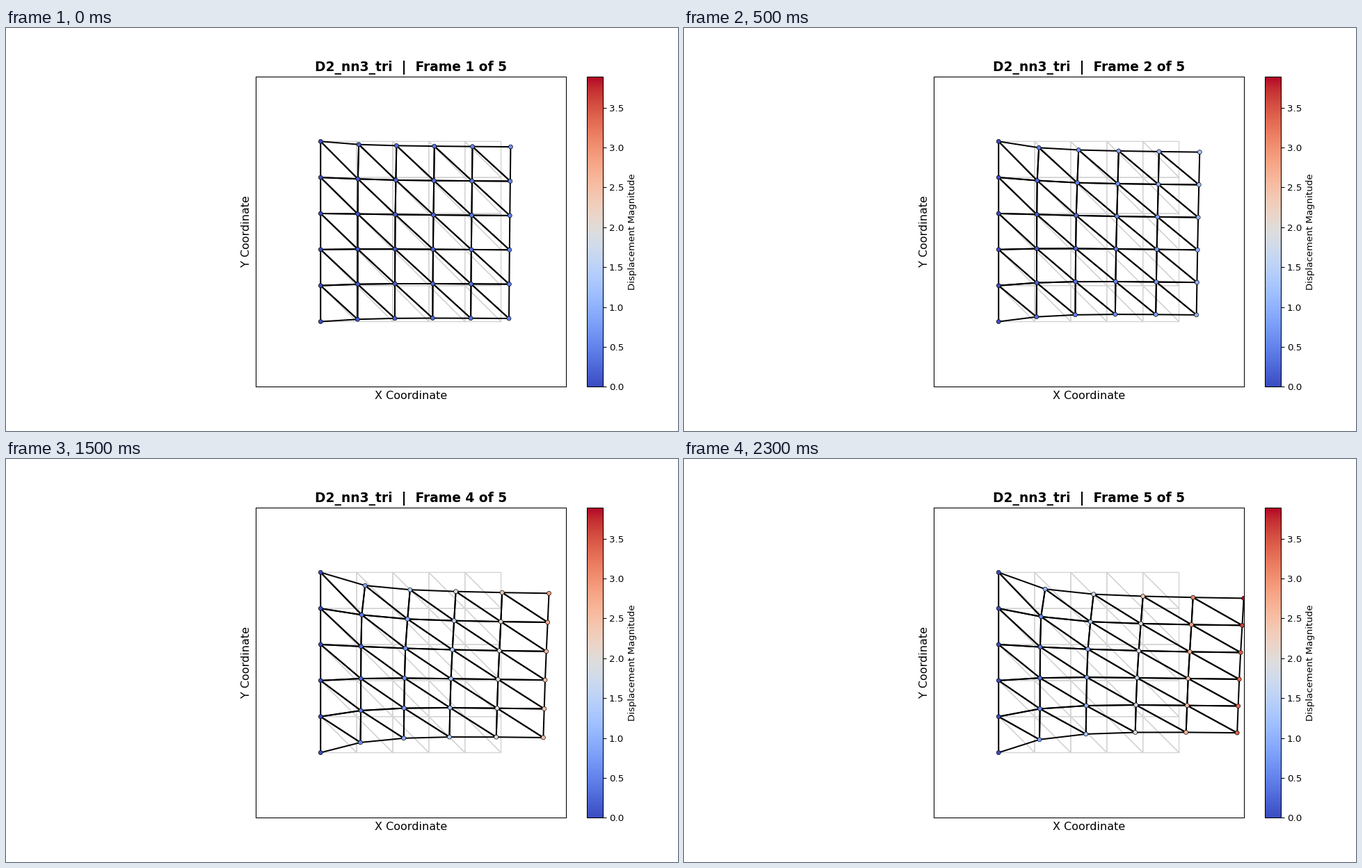
Write a matplotlib script that moves like this. It is 966 by 580 pixels and loops after 2.5 s.

```python
import numpy as np
import matplotlib.pyplot as plt
from matplotlib.animation import FuncAnimation
from matplotlib.collections import PolyCollection

W, H, DPI = 966, 580, 96
STEPS = 5
SIDE, MARGIN = 10, 3.61
PX = 25.94          # pixels per data unit
MAX_DISP = 3.894

# Final displacement in pixels (right, down); rows run top to bottom,
# columns left to right, the first column is clamped.
END_X = np.array([
    [0, 15.1, 32.8, 51.9, 72.0, 93.1],
    [0, 9.1, 28.3, 48.9, 69.8, 90.9],
    [0, 7.9, 24.6, 45.9, 67.3, 88.6],
    [0, 7.6, 23.1, 43.4, 65.0, 86.6],
    [0, 7.6, 22.3, 41.9, 63.5, 85.1],
    [0, 6.9, 21.8, 40.9, 62.0, 83.6],
])
END_Y = np.array([
    [0, 24.0, 31.4, 34.3, 36.0, 37.2],
    [0, 11.8, 19.1, 21.8, 23.3, 24.3],
    [0, 3.6, 6.7, 9.0, 10.5, 11.5],
    [0, -3.7, -4.7, -3.9, -2.9, -1.9],
    [0, -11.2, -15.7, -16.7, -16.0, -15.2],
    [0, -18.8, -26.7, -29.1, -29.2, -28.5],
])

row, col = np.mgrid[0:6, 0:6]
free = np.where(col > 0, 1.0, 0.0)
bend_x = -free * (8.2 * (col - 1) + 0.14 * row * col)
bend_y = free * (-2.2 + row + 1.1 * (col - 1))
rest = np.stack([col * SIDE / 5, SIDE - row * SIDE / 5], axis=-1).reshape(-1, 2)

triangles = []
for r in range(5):
    for c in range(5):
        tl = 6 * r + c
        triangles += [(tl, tl + 6, tl + 7), (tl, tl + 7, tl + 1)]
triangles = np.array(triangles)


def displacement(s):
    """Node displacement in data units at load fraction s."""
    bow = s * (1 - s)
    dx = END_X * s + bend_x * bow * (0.87 + 0.22 * s)
    dy = END_Y * s + bend_y * bow
    return np.stack([dx, -dy], axis=-1).reshape(-1, 2) / PX


def mesh(points, **style):
    return PolyCollection(points[triangles], facecolors="none", **style)


plt.rcParams["font.family"] = "DejaVu Sans"
fig = plt.figure(figsize=(W / DPI, H / DPI), dpi=DPI, facecolor="white")
ax = fig.add_axes([358.6 / W, 0.11, 446.6 / W, 0.77])
cax = fig.add_axes([835.3 / W, 0.11, 22.3 / W, 0.77])

ax.set(xlim=(-MARGIN, SIDE + MARGIN), ylim=(-MARGIN, SIDE + MARGIN),
       xticks=[], yticks=[])
ax.set_xlabel("X Coordinate", fontsize=12)
ax.set_ylabel("Y Coordinate", fontsize=12)
title = ax.set_title("", fontsize=14, fontweight="bold")

ax.add_collection(mesh(rest, edgecolors="lightgray", linewidths=1, zorder=1),
                  autolim=False)
edges = mesh(rest, edgecolors="black", linewidths=1.5, zorder=2)
ax.add_collection(edges, autolim=False)
nodes = ax.scatter(*rest.T, c=np.zeros(len(rest)), s=20, cmap="coolwarm",
                   vmin=0, vmax=MAX_DISP, edgecolors="black",
                   linewidths=0.5, zorder=3)

bar = fig.colorbar(nodes, cax=cax)
bar.set_label("Displacement Magnitude", fontsize=10)


def update(i):
    d = displacement((i + 1) / STEPS)
    points = rest + d
    edges.set_verts(points[triangles])
    nodes.set_offsets(points)
    nodes.set_array(np.hypot(*d.T))
    title.set_text(f"D2_nn3_tri  |  Frame {i + 1} of {STEPS}")
    return edges, nodes, title


anim = FuncAnimation(fig, update, frames=STEPS, interval=500,
                     init_func=lambda: update(0), repeat=True, repeat_delay=0)
plt.show()
```
